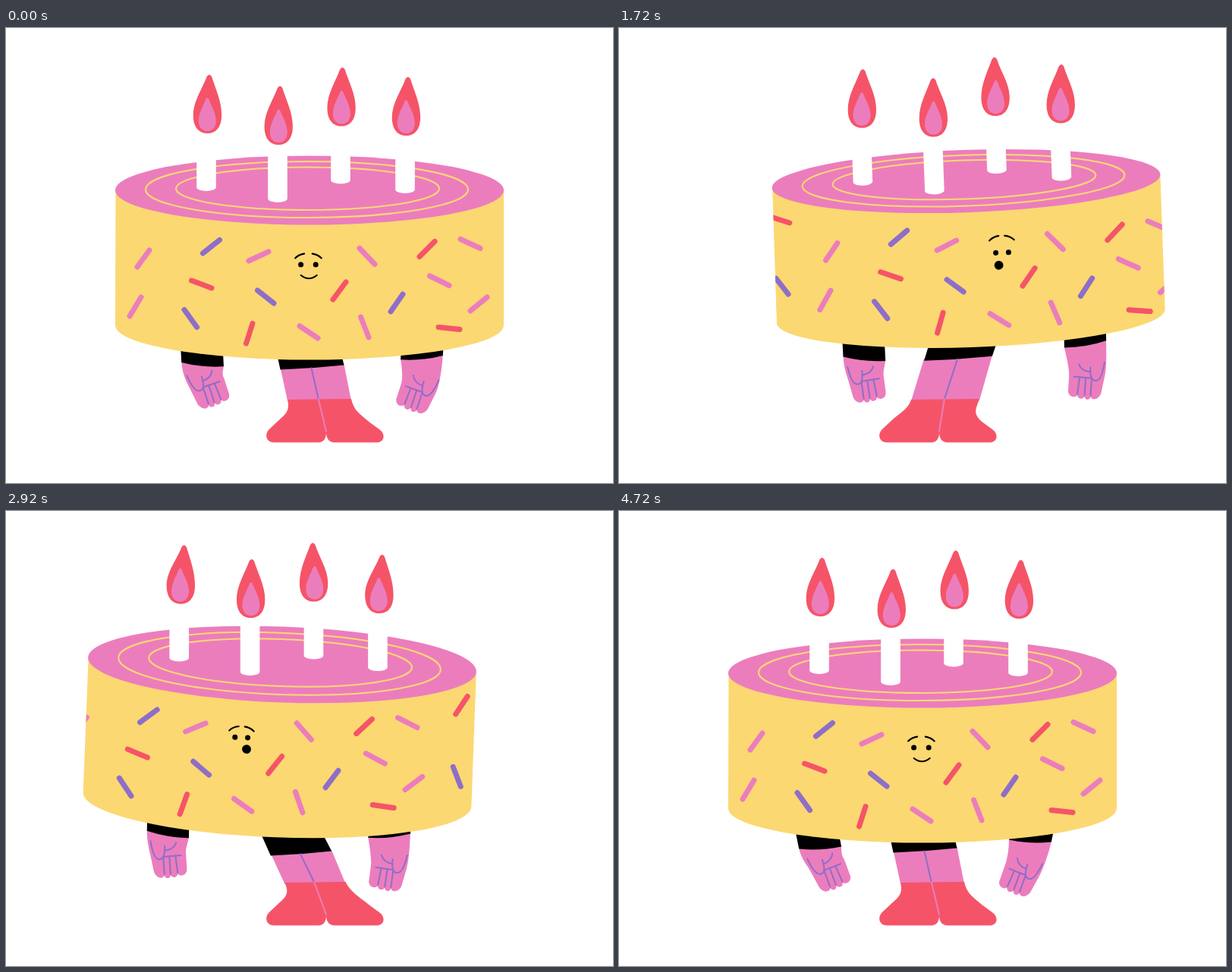
Recreate the animation shown at these times as an HTML page. Size 800 px wide and 600 px high, loop 4760 ms.

```html
<!DOCTYPE html>
<html lang="en">
<head>
<meta charset="utf-8">
<title>Birthday cake</title>
<style>
html, body { margin: 0; width: 100%; height: 100%; overflow: hidden; background: #fff; }
svg { display: block; width: 100%; height: 100%; }
.pink { fill: #ec7dbd; }
.red { fill: #f55468; }
.yellow { fill: #fbd872; }
.line { fill: none; stroke: #8e6ec8; stroke-width: 2; stroke-linecap: round; stroke-linejoin: round; }
.ring { fill: none; stroke: #fbd872; stroke-width: 2; }
.brow { fill: none; stroke: #000; stroke-width: 2.1; stroke-linecap: round; }
.sprinkles { fill: none; stroke-width: 7; stroke-linecap: round; }
</style>
</head>
<body>
<svg id="stage" viewBox="0 0 800 600" xmlns="http://www.w3.org/2000/svg">
  <clipPath id="side"><path id="sideClip"/></clipPath>
  <g id="legs">
    <path id="skin" class="pink"/>
    <path id="trousers"/>
    <path id="shin" class="line"/>
    <path id="boots" class="red"/>
    <path id="seam" class="line" style="stroke:#ec7dbd"/>
  </g>
  <g id="arms"></g>
  <g id="body">
    <path id="wall" class="yellow"/>
    <g clip-path="url(#side)">
      <g id="sprinkles" class="sprinkles">
        <path stroke="#ec7dbd" d="M173 315l16-22M320 307l26-12M466 290.5l20 21M599 278.5l26 12M558.5 327l25.5 12.5M612 373l22-18M163 380l15-25M387 393l24 16M467.5 381l10.5 27"/>
        <path stroke="#8e6ec8" d="M259.5 297l22-17.5M331.5 346l21.5 17M507 374l16-23M235 371.5l16.5 23M106.5 336.5l15.5 21.5M674 340.5l11 25.5"/>
        <path stroke="#f55468" d="M545 301.5l20-20M244.5 333l26.5 10M431 358l17-23M316.5 416l8.5-26.5M570 394.5l28 3M102 255l25 9M675 271l14.5-24"/>
      </g>
    </g>
    <ellipse id="top" class="pink" rx="256"/>
    <ellipse id="ring1" class="ring" cx="-3.5" rx="212.5"/>
    <ellipse id="ring2" class="ring" cx="-2.5" rx="173.5"/>
    <g id="face">
      <path id="brows" class="brow"/>
      <circle id="eyeL" r="3.5"/>
      <circle id="eyeR" r="3.5"/>
      <path id="smile" class="brow"/>
      <circle id="mouth"/>
    </g>
  </g>
  <g id="candles"></g>
</svg>
<script>
const LOOP = 4760;
const $ = id => document.getElementById(id);
const set = (el, attrs) => { for (const k in attrs) el.setAttribute(k, attrs[k]); };
const add = (parent, tag, attrs) => {
  const el = document.createElementNS('http://www.w3.org/2000/svg', tag);
  set(el, attrs);
  return parent.appendChild(el);
};
const clamp = u => Math.min(1, Math.max(0, u));
const smooth = u => u * u * (3 - 2 * u);
const cubic = u => u < .5 ? 4 * u ** 3 : 1 - 4 * (1 - u) ** 3;
const rad = a => a * Math.PI / 180;
const turn = (x, y, a) => {
  const c = Math.cos(rad(a)), s = Math.sin(rad(a));
  return [x * c - y * s, x * s + y * c];
};

// x, y: centre of the top; slide: drawing moves round the side; hem: trouser end
const MID = { x: 400, y: 214, tilt: 0, slide: 0, hem: 403.5 };
const RIGHT = { x: 457.5, y: 202, tilt: -2.02, slide: 38.5, hem: 447 };
const LEFT = { x: 364, y: 202.5, tilt: 2.1, slide: -44, hem: 389 };

// "lean" is added halfway through a move
const MOVES = [
  { at: 0, len: 860, from: MID, to: RIGHT, lean: { tilt: 1.8 } },
  { at: 1783, len: 880, from: RIGHT, to: LEFT, lean: { y: 5.6, tilt: -4.2, slide: 7.6, hem: 8.8 } },
  { at: 3475, len: 890, from: LEFT, to: MID, lean: {} }
];
const phase = (i, t) => clamp((t - MOVES[i].at) / MOVES[i].len);

function poseAt(t) {
  const i = MOVES.findLastIndex(m => m.at <= t);
  const { from, to, lean } = MOVES[i], u = phase(i, t), p = cubic(u);
  const pose = {};
  for (const k in from) {
    pose[k] = from[k] + (to[k] - from[k]) * p + (lean[k] || 0) * Math.sin(Math.PI * u) ** 2;
  }
  return pose;
}

// time, candle lean, how far the flames spread
const WIND = [
  [0, 0, .2], [1000, .4, 1], [1720, -2.2, .4], [2280, 1.5, 1.1],
  [2920, 0, 1], [3760, 1.4, 0], [LOOP, 0, .1]
];
function windAt(t) {
  const i = WIND.findIndex(w => w[0] > t);
  const a = WIND[i - 1], b = WIND[i], u = smooth((t - a[0]) / (b[0] - a[0]));
  return a.map((v, k) => v + (b[k] - v) * u);
}

// each arm hangs from its shoulder; the right one is a mirror image
const ARMS = [
  { side: 1, x: -135, y: 189, palm: 71 },
  { side: -1, x: 142, y: 180, palm: 86.5 }
];
for (const arm of ARMS) {
  arm.g = add($('arms'), 'g', {});
  arm.skin = add(arm.g, 'path', { class: 'pink' });
  add(arm.g, 'path', { d: 'M-36 0L-30 41Q-2 45.5 26 41L20 0Z' });
  arm.lines = add(arm.g, 'path', {
    class: 'line',
    d: 'M-15-22C-14-8-11 3-5 3S3-6 3-14M2-8C10-8 16-11 18.5-17M0 0H23.5M0 0L-.5 23M8 0L7.5 23.5M16 0L17 22.5'
  });
}

function drawArms(pose, t) {
  const speed = (poseAt(t + 15).x - poseAt(Math.max(0, t - 15)).x) / 30;
  const out = cubic(phase(0, t)), back = cubic(phase(2, t));
  const spread = 5.5 + 2 * out - 10.5 * back;
  const wrist = -25 + 10.5 * out - 4 * back;
  for (const { side, x, y, palm, g, skin, lines } of ARMS) {
    const [sx, sy] = turn(x, y, pose.tilt);
    const swing = spread + side * (pose.tilt + 21 * speed);
    const kx = 1.5 - 4.5 * (out - back);
    const P = (px, py) => {
      const [dx, dy] = turn(px, py, wrist);
      return [kx + dx, palm + dy];
    };
    set(g, { transform: `translate(${pose.x + sx} ${pose.y + sy}) scale(${side} 1) rotate(${swing})` });
    set(lines, { transform: `translate(${kx} ${palm}) rotate(${wrist})` });
    set(skin, {
      d: `M-30 40C-28 54 ${P(-18.5, -16)} ${P(-17, -5)}L${P(-14, 19)}` +
        `C${P(-11, 29)} ${P(-2, 29)} ${P(-.8, 24.5)}C${P(0, 30)} ${P(7, 30)} ${P(7.5, 24.5)}` +
        `C${P(9, 29.5)} ${P(16, 29.5)} ${P(17, 23.5)}C${P(18, 28)} ${P(29, 28.5)} ${P(29.5, 19)}` +
        `L${P(30, 0)}C${P(30, -8)} 25 54 26 40Z`
    });
  }
}

function drawLegs({ x, hem }) {
  const shift = hem - MID.hem, half = 42 + (x - MID.x) * .05;
  const hy = 447.5 - .27 * shift, ax = 413 + .39 * shift, ay = 489.5;
  const dx = ax - hem, dy = ay - hy, len = Math.hypot(dx, dy);
  const l = hem - half, r = hem + half, bl = ax - half, br = ax + half;
  const along = (px, py) => [px + dx / len * 14, py + dy / len * 14];
  set($('skin'), { d: `M${l} ${hy}L${bl} ${ay + 2}H${br}L${r} ${hy - 4}Z` });
  set($('trousers'), { d: `M${l - dx} ${hy - dy}L${l} ${hy + 3}Q${hem} ${hy + 1.5} ${r} ${hy - 3}L${r - dx} ${hy - dy}Z` });
  set($('shin'), { d: `M${hem - 1} ${hy + 1}L${ax - 1.2} ${ay}` });
  set($('seam'), { d: `M${ax - 1.2} ${ay}L422 532` });
  set($('boots'), {
    d: `M${bl} ${ay + .5}C${along(bl, ay)} 370 508 362 515L347 529` +
      'C340 536 343 546.5 353 546.5H412Q421.5 546 422 534Q422.5 546 433 546.5H488' +
      `C498 546.5 501 537 493 530L480 520.5C465 508.5 ${along(br, ay)} ${br} ${ay - .5}Z`
  });
}

function drawBody({ x, y, tilt, slide, }, t) {
  const ry = 45.5 + 2.15 * tilt, k = ry / 45.5;
  const wall = `M-255.5 0L-256 178A256 ${ry} 0 0 0 256 178V0Z`;
  const right = Math.max(0, slide), drop = -.085 * right, lift = .2 * right;
  set($('body'), { transform: `translate(${x} ${y}) rotate(${tilt})` });
  set($('wall'), { d: wall });
  set($('sideClip'), { d: wall });
  set($('sprinkles'), { transform: `translate(${slide - MID.x} ${drop - MID.y})` });
  set($('top'), { ry });
  set($('ring1'), { cy: -k, ry: 37 * k });
  set($('ring2'), { cy: -2.2 * k, ry: 28.2 * k });

  const gasp = smooth(clamp((t - 180) / 160)) - smooth(clamp((t - 4080) / 160));
  const eye = 9.8 - 1.4 * gasp, far = 17.3 - gasp, near = 5.3 - 1.3 * gasp;
  const mx = .8 - .15 * slide, w = 10.5 * (1 - gasp);
  const brow = s => `M${s * far} ${-8.6 - lift}Q${s * (far - 5)} ${-13.6 - lift} ${s * near} ${-14.4 - lift}`;
  set($('face'), { transform: `translate(${-1.6 + slide * (1.15 + .001 * slide)} ${98 + drop * .7})` });
  set($('brows'), { d: brow(-1) + brow(1) });
  set($('eyeL'), { cx: -eye });
  set($('eyeR'), { cx: eye });
  set($('smile'), {
    d: `M${mx - w} 14Q${mx} 22.5 ${mx + w} 14`,
    visibility: gasp < .5 ? 'visible' : 'hidden'
  });
  set($('mouth'), { cx: mx, cy: 15.2 + .18 * lift, r: gasp < .5 ? 0 : 5.9 * gasp });
}

const CANDLES = [
  { x: -136, y: -4, sway: 2.3 },
  { x: -42, y: 11, sway: -.8 },
  { x: 41, y: -13.5, sway: -3.3 },
  { x: 126, y: -1, sway: 1.8 }
];
for (const c of CANDLES) {
  c.stick = add($('candles'), 'path', { fill: '#fff', d: 'M-12.8-66V0A12.8 5 0 0 0 12.8 0V-66Z' });
  c.flame = add($('candles'), 'path', { class: 'red' });
  c.core = add($('candles'), 'path', {
    class: 'pink',
    d: 'M-1.8-45.5Q0-48.5 1.8-45.5C5-37 11.5-27 11.5-16.5C11.5-8 6.5-3 0-3S-11.5-8-11.5-16.5C-11.5-27-5-37-1.8-45.5Z'
  });
}

function drawCandles(pose, t) {
  const [, lean, spread] = windAt(t);
  for (const k of CANDLES) {
    const [dx, dy] = turn(k.x, k.y, pose.tilt);
    const x = pose.x + dx, y = pose.y + dy;
    const drift = spread * k.sway, tip = 2 + .9 * lean + drift;
    const fx = x + 1.3 + 71 * Math.sin(rad(lean)), fy = y - 71;
    set(k.stick, { transform: `translate(${x} ${y}) rotate(${lean})` });
    set(k.core, { transform: `translate(${fx} ${fy})` });
    set(k.flame, {
      transform: `translate(${fx + .35 * drift} ${fy})`,
      d: `M${tip - 3.2} -75Q${tip} -80 ${tip + 3.2} -75C${tip + 8} -59 18.7 -43 18.7 -24` +
        `C18.7 -8 11 0 0 0S-18.7 -8 -18.7 -24C-18.7 -43 ${tip - 9} -59 ${tip - 3.2} -75Z`
    });
  }
}

function draw(t) {
  const pose = poseAt(t);
  drawLegs(pose);
  drawArms(pose, t);
  drawBody(pose, t);
  drawCandles(pose, t);
}

let start = null;
function tick(now) {
  if (start === null) start = now;
  draw((now - start) % LOOP);
  requestAnimationFrame(tick);
}
draw(0);
requestAnimationFrame(tick);
</script>
</body>
</html>
```
